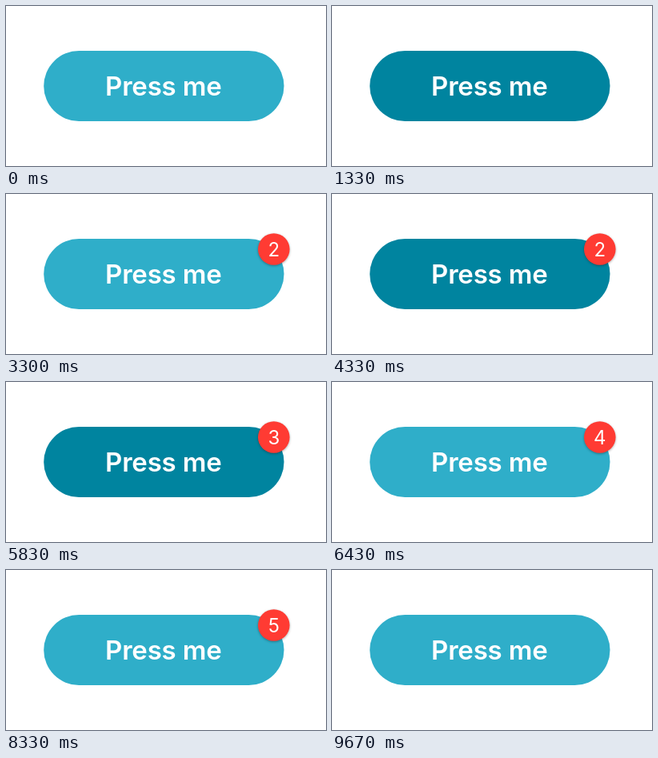
An HTML page that plays this animation: 400x200 px, repeating every 9.87 s.

```html
<!DOCTYPE html>
<html lang="en">
<head>
<meta charset="utf-8">
<title>Press me</title>
<style>
  html, body { margin: 0; width: 100%; height: 100%; overflow: hidden; background: #fff; }
  svg { display: block; width: 100%; height: 100%; }
  text { font-family: Inter, Roboto, sans-serif; fill: #fff; text-anchor: middle; }
  .label { font-size: 33px; font-weight: 600; letter-spacing: -.2px; }
  .count { font-size: 24px; font-weight: 400; }
  .disc { fill: #ff3b33; filter: drop-shadow(0 1px 1.5px rgba(0, 0, 0, .33)); }
</style>
</head>
<body>
<svg viewBox="0 0 400 200">
  <rect id="button" x="47.2" y="56" width="300.3" height="88" rx="44"/>
  <text class="label" x="196.8" y="112">Press me</text>
  <g id="badge">
    <circle class="disc" r="19.8"/>
    <text class="count" id="count" y="8.8"></text>
  </g>
</svg>
<script>
const LOOP = 9870;
const LIGHT = '#2faec9', DARK = '#00849f';
// [pressed, released] in ms; each release adds one to the count
const presses = [[1270, 1700], [2770, 3230], [4330, 4800], [5830, 6400], [7400, 8030], [9130, 9670]];
const resetAt = 9670;
const [button, badge, count] = ['button', 'badge', 'count'].map(id => document.getElementById(id));

// Underdamped spring from 0 to 1, peaking near 1.07 after 260 ms
function spring(ms) {
  const s = ms / 1000, w = 12.1, a = 10.2;
  return 1 - Math.exp(-a * s) * (Math.cos(w * s) + a / w * Math.sin(w * s));
}

function draw(t) {
  const down = presses.some(([from, to]) => t >= from && t < to);
  const total = t < resetAt ? presses.filter(([, to]) => t >= to).length : 0;
  button.setAttribute('fill', down ? DARK : LIGHT);
  badge.setAttribute('visibility', total ? 'visible' : 'hidden');
  count.textContent = total || '';
  if (total) badge.setAttribute('transform', `translate(334.8 69) scale(${spring(t - presses[0][1])})`);
}

const start = performance.now();
function frame(now) {
  draw(Math.max(0, now - start) % LOOP);
  requestAnimationFrame(frame);
}
draw(0);
requestAnimationFrame(frame);
</script>
</body>
</html>
```
